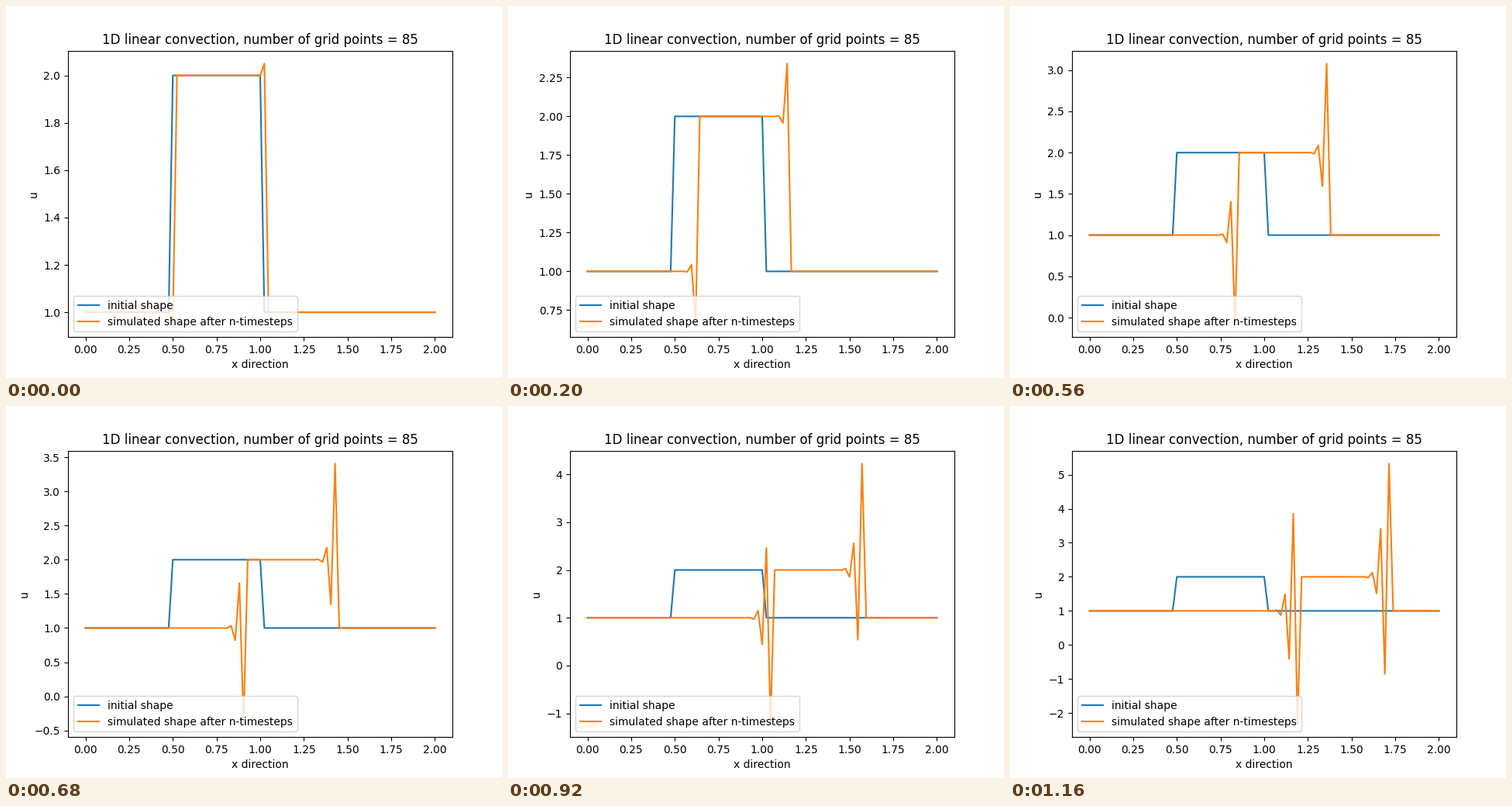
Write a matplotlib script that moves like this. It is 640x480 px and loops after 1200 ms.

```python
import numpy as np
import matplotlib.pyplot as plt
from matplotlib.animation import FuncAnimation

GRID_POINTS = 85
STEPS = 30
INTERVAL = 40
SPEED = 1.0
DT = 0.025

x = np.linspace(0, 2, GRID_POINTS)
dx = 2 / (GRID_POINTS - 1)
courant = SPEED * DT / dx

initial = np.ones(GRID_POINTS)
initial[(x > 0.5 - dx / 2) & (x < 1 + dx / 2)] = 2


def convect(u, steps):
    """Advance u with the first-order upwind scheme."""
    u = u.copy()
    for _ in range(steps):
        u[1:] -= courant * np.diff(u)
    return u


fig, ax = plt.subplots(figsize=(6.4, 4.8), dpi=100)
ax.plot(x, initial, label="initial shape")
wave, = ax.plot(x, initial, label="simulated shape after n-timesteps")
ax.set_title(f"1D linear convection, number of grid points = {GRID_POINTS}")
ax.set_xlabel("x direction")
ax.set_ylabel("u")
ax.legend(loc="lower left")


def update(frame):
    wave.set_ydata(convect(initial, frame + 1))
    ax.relim()
    ax.autoscale_view()
    return wave,


anim = FuncAnimation(fig, update, frames=STEPS, interval=INTERVAL,
                     init_func=lambda: update(0), repeat=True, repeat_delay=0)
plt.show()
```
